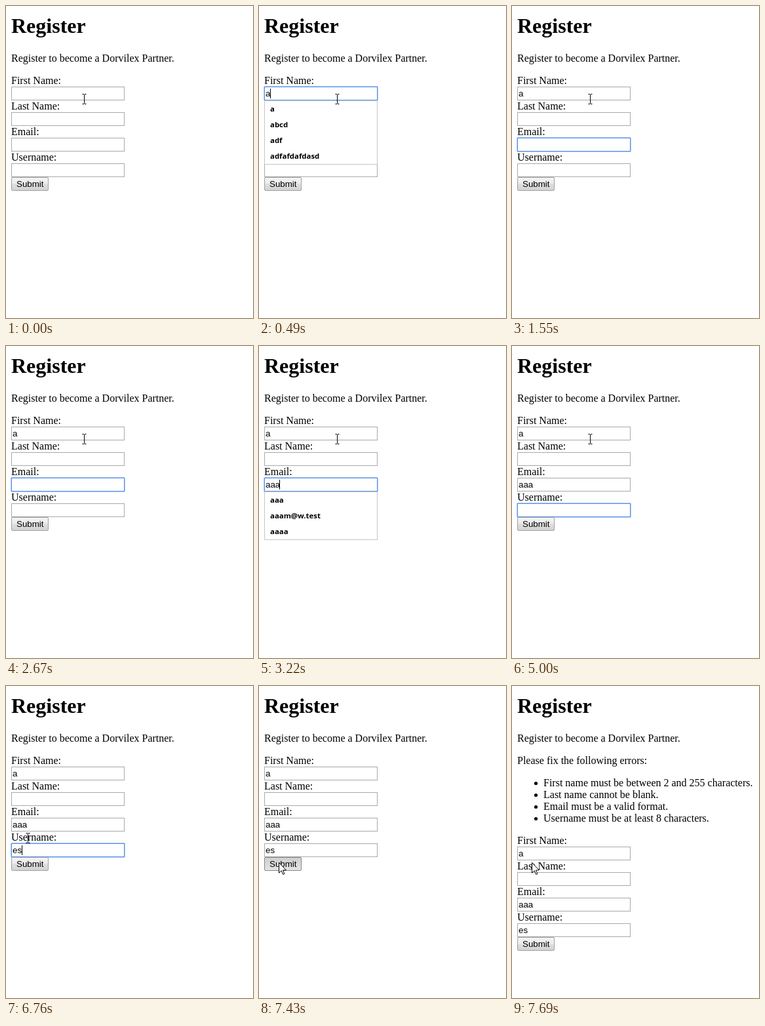
Recreate the animation shown at these times as an HTML page. Size 377x476 px, loop 8 s.

```html
<!DOCTYPE html>
<html lang="en">
<head>
<meta charset="utf-8">
<title>Register</title>
<style>
  html, body { margin: 0; width: 100%; height: 100%; overflow: hidden; background: #fff; }
  svg { display: block; width: 377px; height: 476px; }
  text { white-space: pre; }
  .body { font: 16px "Liberation Serif", "Times New Roman", serif; }
  .title { font: bold 32px "Liberation Serif", "Times New Roman", serif; }
  .field { font: 13.333px "Liberation Sans", Arial, sans-serif; }
  .option { font: bold 11.4px "Open Sans", "Noto Sans", sans-serif; }
</style>
</head>
<body>
<svg id="stage" viewBox="0 0 377 476" xmlns="http://www.w3.org/2000/svg">
  <defs>
    <linearGradient id="idle" x2="0" y2="1">
      <stop offset="0" stop-color="#f4f4f4"/><stop offset=".5" stop-color="#ebebeb"/>
      <stop offset=".5" stop-color="#dfdfdf"/><stop offset="1" stop-color="#d2d2d2"/>
    </linearGradient>
    <linearGradient id="hover" x2="0" y2="1">
      <stop offset="0" stop-color="#f8f8f8"/><stop offset=".5" stop-color="#f0f0f0"/>
      <stop offset=".5" stop-color="#e6e6e6"/><stop offset="1" stop-color="#dadada"/>
    </linearGradient>
    <linearGradient id="pressed" x2="0" y2="1">
      <stop offset="0" stop-color="#cfcfcf"/><stop offset="1" stop-color="#e4e4e4"/>
    </linearGradient>
  </defs>
  <text class="title" x="8" y="41">Register</text>
  <text class="body" x="8" y="85">Register to become a Dorvilex Partner.</text>
  <g id="errors"></g>
  <g id="form"></g>
  <g id="menu"></g>
  <path id="beam" fill="none" stroke="#000" d="M-3 -7.5H-.5M.5 -7.5H3M0 -7V7M-3 7.5H-.5M.5 7.5H3"/>
  <path id="arrow" fill="#fff" stroke="#000" d="M.5 .5V16.2L4.2 12.8 6.7 18.5 8.9 17.5 6.4 12H11.4Z"/>
</svg>
<script>
const LOOP = 8000;
const NS = "http://www.w3.org/2000/svg";
const $ = id => document.getElementById(id);

function add(parent, tag, attrs, text) {
  const el = document.createElementNS(NS, tag);
  for (const k in attrs) el.setAttribute(k, attrs[k]);
  if (text) el.textContent = text;
  parent.appendChild(el);
  return el;
}
const show = (el, on) => el.setAttribute("display", on ? "inline" : "none");
const move = (el, [x, y]) => el.setAttribute("transform", `translate(${x} ${y})`);
const box = (parent, x, y, w, h, attrs) =>
  add(parent, "rect", { x: x + .5, y: y + .5, width: w - 1, height: h - 1, ...attrs });

// Validation messages
add($("errors"), "text", { class: "body", x: 8, y: 119 }, "Please fix the following errors:");
[
  "First name must be between 2 and 255 characters.",
  "Last name cannot be blank.",
  "Email must be a valid format.",
  "Username must be at least 8 characters."
].forEach((msg, i) => {
  add($("errors"), "circle", { cx: 36.5, cy: 148.5 + 18 * i, r: 2.6 });
  add($("errors"), "text", { class: "body", x: 48, y: 153 + 18 * i }, msg);
});

// Form rows
const rowTop = i => 123 + 39 * i;
const rows = ["First Name:", "Last Name:", "Email:", "Username:"].map((label, i) => {
  const y = rowTop(i), form = $("form");
  add(form, "text", { class: "body", x: 8, y: y - 4 }, label);
  box(form, 8, y, 173, 21, { fill: "#fff", stroke: "#a9a9a9" });
  const ring = add(form, "g", { fill: "none" });
  box(ring, 7, y - 1, 175, 23, { rx: 1.5, stroke: "#a9c6f6" });
  box(ring, 8, y, 173, 21, { stroke: "#5b93ea" });
  const value = add(form, "text", { class: "field", x: 10, y: y + 15 });
  const caret = add(form, "rect", { y: y + 3, width: 1, height: 15 });
  return { ring, value, caret };
});

const button = box($("form"), 8, 261, 57, 21, { rx: 1.5 });
add($("form"), "text", { class: "field", x: 16, y: 276 }, "Submit");

// Suggestion menus
function makeMenu(row, items) {
  const g = add($("menu"), "g"), y = rowTop(row) + 21;
  box(g, 8, y, 173, 24 * items.length + 2, { fill: "#fff", stroke: "#c4c4c4" });
  items.forEach((s, i) => add(g, "text", { class: "option", x: 17, y: y + 17 + 24 * i }, s));
  return g;
}
const mails = ["aaa", "aaam@w.test", "aaaa"];
const menus = {
  first: makeMenu(0, ["a", "abcd", "adf", "adfafdafdasd"]),
  mailAll: makeMenu(2, [...mails, "abcd", "adf", "asdf"]),
  mail: makeMenu(2, mails)
};

// Each step changes part of the state from its time on
const steps = [
  [0, { text: ["", "", "", ""], focus: -1, caret: 0, caretX: 10, menu: "",
        beam: [119.5, 142], arrow: null, button: "idle", failed: false }],
  [120, { focus: 0, caret: 1 }],
  [370, { text: ["a", "", "", ""], caretX: 17 }],
  [490, { menu: "first" }],
  [770, { menu: "", focus: 1, caretX: 10 }],
  [1050, { focus: 2 }],
  [1550, { caret: 0 }],
  [2170, { caret: 1 }],
  [2670, { caret: 0 }],
  [2820, { text: ["a", "", "a", ""], caret: 1, caretX: 17, menu: "mailAll" }],
  [3090, { text: ["a", "", "aa", ""], caretX: 24, menu: "mail" }],
  [3220, { text: ["a", "", "aaa", ""], caretX: 31 }],
  [3370, { menu: "", focus: 3, caretX: 10 }],
  [3870, { caret: 0 }],
  [4500, { caret: 1 }],
  [5000, { caret: 0 }],
  [5380, { text: ["a", "", "aaa", "e"], caret: 1, caretX: 17 }],
  [5520, { text: ["a", "", "aaa", "es"], caretX: 24 }],
  [6020, { caret: 0 }],
  [6520, { caret: 1 }],
  [6640, { beam: [70.5, 186] }],
  [6760, { beam: [33.5, 232] }],
  [6890, { beam: [31.5, 252] }],
  [7020, { beam: null, arrow: [30, 267], button: "hover", caret: 0 }],
  [7140, { arrow: [30, 269] }],
  [7430, { focus: -1, button: "pressed" }],
  [7690, { failed: true, button: "idle" }]
];
const borders = { idle: "#a0a0a0", hover: "#868686", pressed: "#868686" };

function draw(t) {
  const s = Object.assign({}, ...steps.filter(([at]) => at <= t).map(([, part]) => part));
  rows.forEach((r, i) => {
    r.value.textContent = s.text[i];
    show(r.ring, s.focus === i);
    show(r.caret, s.focus === i && s.caret);
    r.caret.setAttribute("x", s.caretX);
  });
  for (const k in menus) show(menus[k], s.menu === k);
  show($("errors"), s.failed);
  move($("form"), [0, s.failed ? 122 : 0]);
  button.setAttribute("fill", `url(#${s.button})`);
  button.setAttribute("stroke", borders[s.button]);
  for (const k of ["beam", "arrow"]) {
    show($(k), s[k]);
    if (s[k]) move($(k), s[k]);
  }
}

const start = performance.now();
function tick() {
  draw((performance.now() - start) % LOOP);
  requestAnimationFrame(tick);
}
tick();
</script>
</body>
</html>
```
